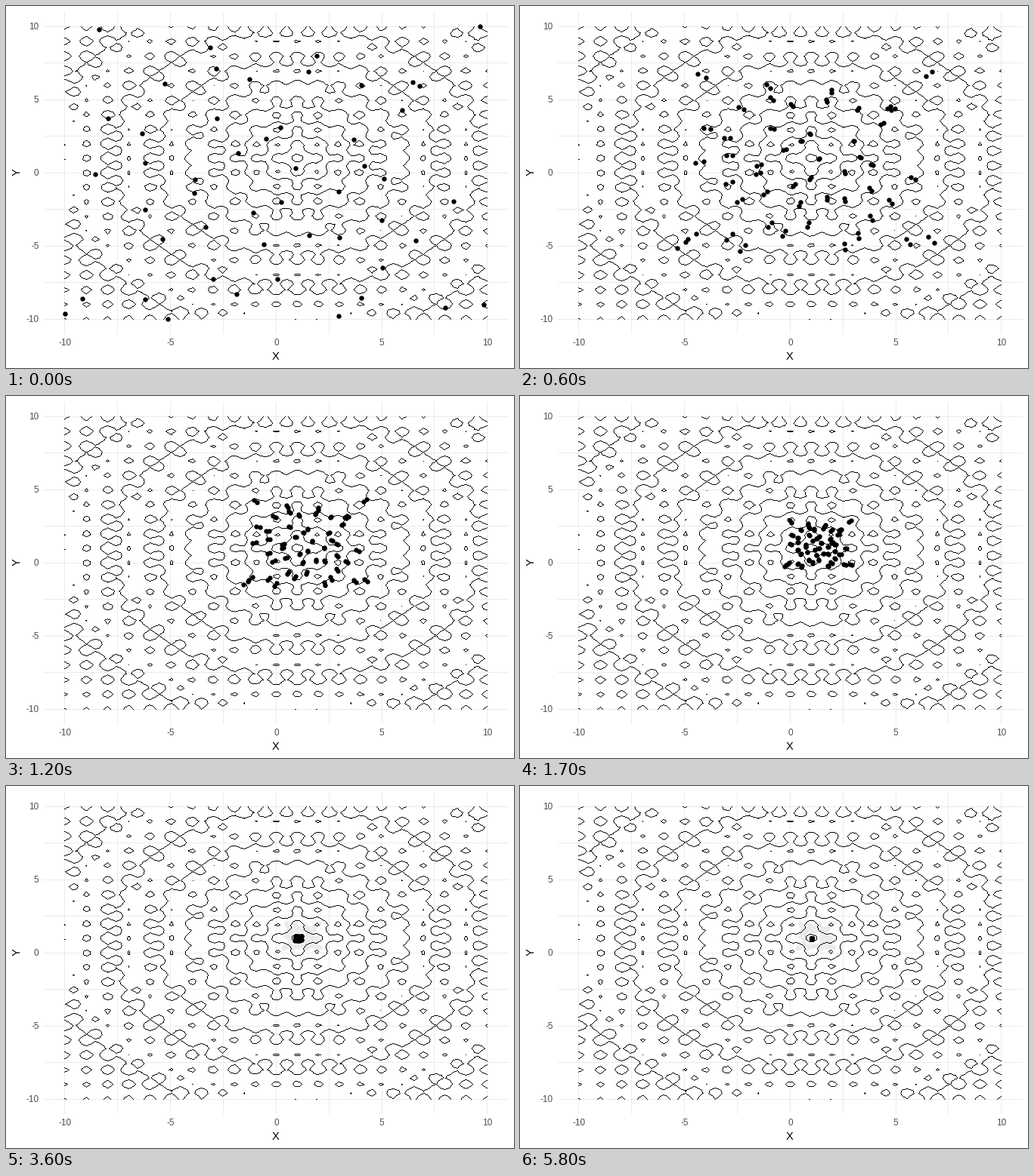
Animation, 672 px wide and 480 px high, one loop 10 s. Source, as a matplotlib script:

```python
import numpy as np
import matplotlib.pyplot as plt
from matplotlib.animation import FuncAnimation

W, H, DPI = 672, 480, 96
PT = 72 / DPI  # points per pixel
FRAMES, STEP_MS = 100, 100
GRID = 235 / 255
DOT = dict(s=(6.4 * PT) ** 2, linewidths=0, antialiaseds=False)

plt.rcParams["font.family"] = "Liberation Sans"


def px(x):
    return 356.87 + 27.945 * np.asarray(x)


def py(y):
    return 220.8 - 19.4 * np.asarray(y)


def ackley(x, y):
    """Ackley function with its minimum moved to (1, 1)."""
    r = np.sqrt(0.5 * ((x - 1) ** 2 + (y - 1) ** 2))
    waves = 0.5 * (np.cos(2 * np.pi * x) + np.cos(2 * np.pi * y))
    return 20 - 20 * np.exp(-0.2 * r) + np.e - np.exp(waves)


def start_places():
    """A few outlying particles and a jittered 6 x 6 block inside them."""
    rim = [(122, 30), (269, 54), (410, 65), (626, 26), (546, 105),
           (591, 258), (631, 395), (580, 399), (439, 410), (213, 414),
           (77, 407), (100, 387), (117, 222), (134, 148)]
    rng = np.random.default_rng(4)
    cells = np.stack(np.meshgrid(np.arange(6), np.arange(6)), -1)
    spots = cells.reshape(-1, 2) + rng.uniform(0.05, 0.95, (36, 2))
    return np.vstack([rim, [150, 75] + spots * [66, 53]])


def fly(pos, inertia=0.7, pull=0.0153, jump=24):
    """Particle swarm: the best spot is first near (2, 2), then at (1, 1)."""
    vel = np.zeros_like(pos)
    path = [pos]
    for it in range(1, 2 * FRAMES):
        best = 2 if it < jump else 1
        vel = inertia * vel + pull * (np.array([px(best), py(best)]) - pos)
        pos = pos + vel
        path.append(pos)
    return np.round(path)


def layer(mask, shade, zorder):
    """Show the marked pixels in one shade of grey."""
    rgba = np.full((H, W, 4), shade)
    rgba[..., 3] = mask
    ax.imshow(rgba, interpolation="nearest", aspect="auto", zorder=zorder,
              extent=(-0.5, W - 0.5, H - 0.5, -0.5))


def pixel_line(mask, a, b):
    n = int(np.abs(b - a).max()) + 1
    x, y = np.round(np.linspace(a, b, n)).astype(int).T
    mask[y, x] = 1


fig = plt.figure(figsize=(W / DPI, H / DPI), dpi=DPI, facecolor="white")
ax = fig.add_axes([0, 0, 1, 1])

# grid lines, major and minor
grid = np.zeros((H, W))
for v in np.arange(-10, 10.1, 2.5):
    col, row = int(np.round(px(v))), int(np.round(py(v)))
    grid[8:435, col] = 1
    grid[row, 50:665] = 1
layer(grid, GRID, 1)

# contour lines, one hard pixel wide
nodes = np.linspace(-10, 10, 100)
gx, gy = np.meshgrid(nodes, nodes)
cs = ax.contour(px(gx), py(gy), ackley(gx, gy), levels=np.arange(2, 21, 2))
lines = np.zeros((H, W))
for level in cs.allsegs:
    for seg in level:
        pts = np.round(seg)
        for a, b in zip(pts[:-1], pts[1:]):
            pixel_line(lines, a, b)
cs.remove()
layer(lines, 0.0, 4)

ax.set_xlim(-0.5, W - 0.5)
ax.set_ylim(H - 0.5, -0.5)
ax.axis("off")

for v in range(-10, 11, 5):
    tick = dict(color="#4d4d4d", fontsize=11.8 * PT, va="center")
    ax.text(px(v), 447, str(v), ha="center", **tick)
    ax.text(43, py(v) + 0.5, str(v), ha="right", **tick)
title = dict(color="black", fontsize=14.67 * PT, ha="center", va="center")
ax.text(356.5, 464.5, "X", **title)
ax.text(14.5, 220, "Y", rotation=90, **title)

PATH = fly(start_places())


def shown(first, last):
    """Places in these frames; every frame holds two iterations."""
    return PATH[max(2 * first - 1, 0):max(2 * last + 1, 0)].reshape(-1, 2)


# late in the flight the swarm leaves a grey, then a white trail
grey = ax.scatter([], [], color=str(GRID), zorder=2, **DOT)
white = ax.scatter([], [], color="white", zorder=3, **DOT)
dots = ax.scatter([], [], color="black", zorder=5, **DOT)


def draw(k):
    grey.set_offsets(shown(22, min(k - 1, 32)))
    white.set_offsets(shown(33, min(k - 1, 57)))
    dots.set_offsets(shown(k, k))
    return grey, white, dots


anim = FuncAnimation(fig, draw, frames=FRAMES, interval=STEP_MS,
                     init_func=lambda: draw(0), repeat=True, repeat_delay=0)
plt.show()
```
